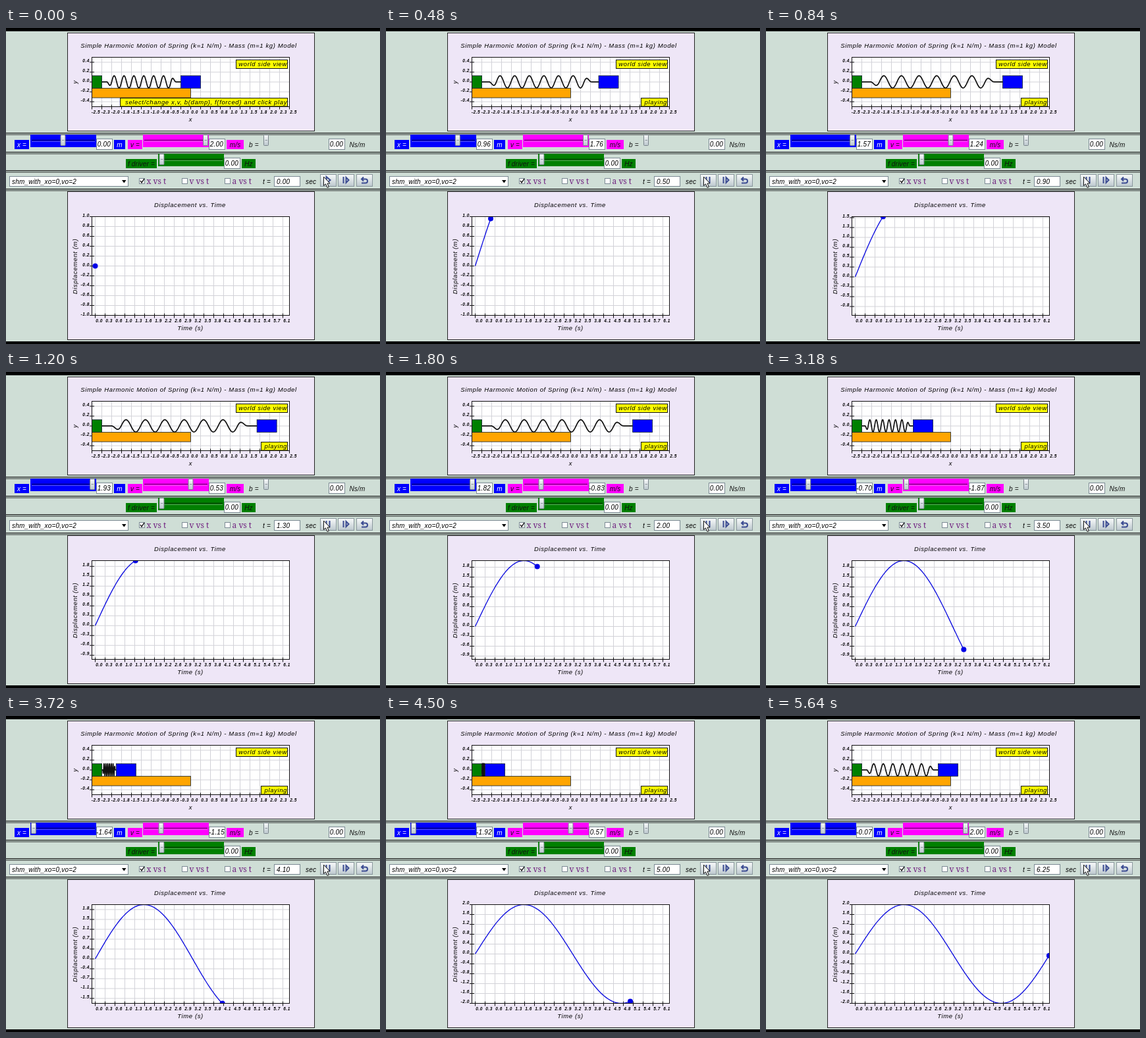
These frames come from a looping animation (568 by 480 pixels, 5700 ms). An HTML page:

```html
<!DOCTYPE html>
<html lang="en">
<head>
<meta charset="utf-8">
<title>Spring and mass model</title>
<style>
html, body { margin: 0; width: 100%; height: 100%; overflow: hidden; background: #cfded6; }
svg { display: block; width: 568px; height: 480px; }
text { font: italic 10px "Liberation Sans", Arial, sans-serif; letter-spacing: .2px; white-space: pre; }
.cap text, text.cap { font-size: 9.5px; letter-spacing: .62px; }
.num text { font-weight: bold; font-size: 6.5px; letter-spacing: .55px; }
.mid, .mid text { text-anchor: middle; }
.end, .end text { text-anchor: end; }
.check text { font: 12px "Noto Serif", serif; letter-spacing: 0; fill: #702080; }
.box { fill: #fff; stroke: #7c8a94; }
.panel { fill: #eee6f7; stroke: #222; }
.plot { fill: #fff; stroke: none; }
.frame { fill: none; stroke: #111; }
.grid { stroke: #d2d2d8; fill: none; }
.tick { stroke: #111; fill: none; }
.note { fill: #ff0; stroke: #111; }
.body { stroke: #102030; stroke-width: .8; }
.icon { fill: none; stroke: #3c4c92; stroke-width: 2; }
</style>
</head>
<body>
<svg viewBox="0 0 568 480">
  <defs>
    <clipPath id="view"><rect x="130" y="286" width="301" height="151"/></clipPath>
    <linearGradient id="metal" x2="0" y2="1">
      <stop offset="0" stop-color="#f8fafa"/><stop offset="1" stop-color="#bcc8ce"/>
    </linearGradient>
    <g id="knob">
      <rect x="-3.5" y="-8.5" width="7" height="16" rx="1" fill="url(#metal)" stroke="#7b858c"/>
      <path d="M-1.5 -.5H2" stroke="#8b959c"/>
    </g>
    <rect id="button" x=".5" y="222.5" width="24" height="18" fill="url(#metal)" stroke="#8a979d"/>
  </defs>

  <rect width="568" height="480" fill="#cfded6"/>
  <path d="M0 0H568V5H0ZM0 476H568V480H0Z"/>
  <g id="rules"></g>

  <!-- world view -->
  <rect class="panel" x="93.5" y="7.5" width="375" height="149"/>
  <rect class="plot" x="130.5" y="44.5" width="300" height="75"/>
  <g id="worldAxes"></g>
  <g class="cap mid">
    <text x="277.5" y="30">Simple Harmonic Motion of Spring (k=1 N/m) - Mass (m=1 kg) Model</text>
    <text x="280.5" y="142">x</text>
    <text transform="translate(108 82) rotate(-90)">y</text>
  </g>
  <rect class="body" x="130.5" y="91.5" width="150" height="14.5" fill="#ffa500"/>
  <rect class="body" x="130.5" y="72.5" width="15" height="19" fill="#008000"/>
  <path id="spring" fill="none" stroke="#111" stroke-width="1.7" stroke-linejoin="round"/>
  <rect id="mass" class="body" y="72.5" width="30" height="19" fill="#00f"/>
  <rect class="frame" x="130.5" y="44.5" width="300" height="75"/>
  <g class="cap end">
    <rect class="note" x="349.5" y="48.5" width="78" height="13"/>
    <text x="427" y="58">world side view</text>
    <rect id="noteBox" class="note" y="106.5" height="12.5"/>
    <text id="note" x="427" y="116"></text>
  </g>

  <!-- controls -->
  <g id="sliders"></g>
  <rect class="box" x="5.5" y="225.5" width="180" height="15"/>
  <text x="9" y="237">shm_with_xo=0,vo=2</text>
  <path d="M176 231h6.5l-3.2 4.5z"/>
  <g id="checks" class="check"></g>
  <text x="390" y="237">t =</text>
  <rect class="box" x="407.5" y="225.5" width="39" height="15"/>
  <text id="clock" x="411" y="237"></text>
  <text x="455" y="237">sec</text>
  <use href="#button" x="477"/><use href="#button" x="504"/><use href="#button" x="532"/>
  <path id="run" class="icon"/>
  <path class="icon" d="M512.5 226V236M516.5 227V235L520.5 231Z"/>
  <path class="icon" d="M543 226.500L540 229.500L543 232.500M540 229.500H546A2.800 2.800 0 0 1 546 235.500H540"/>
  <path d="M482.500 226V239.500L485.500 236.800L488 242.500L490.300 241.500L488 236H492Z" fill="#fff" stroke="#111"/>

  <!-- graph -->
  <rect class="panel" x="93.5" y="248.5" width="375" height="225"/>
  <rect class="plot" x="130.5" y="286.5" width="300" height="150"/>
  <g id="timeAxis"></g>
  <g id="valueAxis"></g>
  <g class="cap mid">
    <text x="279.5" y="271.500">Displacement vs. Time</text>
    <text x="280" y="459">Time (s)</text>
    <text transform="translate(108 362) rotate(-90)">Displacement (m)</text>
  </g>
  <g clip-path="url(#view)">
    <path id="curve" fill="none" stroke="#1414e0" stroke-width="1.4"/>
    <circle id="dot" r="4" fill="#0000e6"/>
  </g>
  <rect class="frame" x="130.5" y="286.5" width="300" height="150"/>
</svg>

<script>
const $ = id => document.getElementById(id);
const range = (n, from = 0) => Array.from({ length: n }, (_, i) => from + i);
const LOOP = 5700, STEP = 60;
const T0 = 135.5, T_SCALE = 47.1, TOP = 286.5, HEIGHT = 150, GAP = 15;

function columns(x0, count, top, bottom, label) {
  return range(count).map(i => {
    const x = x0 + i * GAP;
    return `<path class="grid" d="M${x} ${top}V${bottom}"/>
      <path class="tick" d="M${x} ${bottom - 3}v7"/>
      <g class="num mid"><text x="${x + 6}" y="${bottom + 10}">${label(i)}</text></g>`;
  }).join('');
}

function row(y, label) {
  return `<path class="grid" d="M130.5 ${y}H430.5"/><path class="tick" d="M127 ${y}h7"/>
    <g class="num end"><text x="127" y="${y}">${label}</text></g>`;
}

function tag(x, y, width, fill, ink, label) {
  return `<rect x="${x}" y="${y - 7}" width="${width}" height="14" fill="${fill}"/>
    <text class="mid" x="${x + width / 2}" y="${y + 4}" fill="${ink}">${label}</text>`;
}

function slider(id, x, y, fill, at) {
  return `<rect x="${x}" y="${y - 9}" width="100" height="19" fill="${fill}"/>
    ${fill === 'none' ? '' : `<path d="M${x + 2} ${y - .5}h96" stroke="#000" stroke-opacity=".4" stroke-width="2"/>
    <path d="M${x + 2} ${y + 1.5}h96" stroke="#fff" stroke-opacity=".35"/>`}
    <use id="${id}Knob" href="#knob" x="${at}" y="${y}"/>
    <rect class="box" x="${x + 100.5}" y="${y - 2.5}" width="24" height="16"/>
    <text id="${id}Value" class="mid" x="${x + 112}" y="${y + 9}">0.00</text>`;
}

$('rules').innerHTML = [159.5, 188.5, 216.5, 244.5].map(y =>
  `<path d="M0 ${y}H568M0 ${y + 2.5}H568" stroke="#222"/><path d="M0 ${y + 1.2}H568" stroke="#9aa8a2"/>`).join('');

$('worldAxes').innerHTML =
  columns(130.5, 21, 44.5, 119.5, i => ((i - 10) / 4 + Math.sign(i - 10) * 1e-6).toFixed(1)) +
  range(5, -2).map(k => row(82 - k * GAP, (k / 5).toFixed(1))).join('');

$('timeAxis').innerHTML = columns(T0, 20, TOP, TOP + HEIGHT, i => (i * .319).toFixed(1));

$('sliders').innerHTML =
  tag(13, 177, 22, '#00f', '#fff', 'x =') + slider('x', 37, 171, '#00f', 86.5) +
  tag(164, 177, 17, '#00f', '#fff', 'm') +
  tag(185, 177, 22, '#f0f', '#111', 'v =') + slider('v', 208, 171, '#f0f', 258) +
  tag(335, 177, 26, '#f0f', '#111', 'm/s') +
  tag(366, 177, 21, 'none', '#111', 'b =') + slider('b', 390, 171, 'none', 395) +
  tag(519, 177, 29, 'none', '#111', 'Ns/m') +
  tag(182, 206, 47, '#008000', '#111', 'f driver =') + slider('f', 231, 200, '#008000', 236.5) +
  tag(358, 206, 21, '#008000', '#111', 'Hz');

$('checks').innerHTML = ['x', 'v', 'a'].map((name, i) => {
  const x = [202.5, 267.5, 332.5][i];
  return `<rect class="box" x="${x}" y="228.5" width="8" height="8"/>
    <text x="${x + 11}" y="237">${name} vs t</text>`;
}).join('') + '<path d="M204 232l2 3 4 -6" fill="none" stroke="#222" stroke-width="1.5"/>';

// Eight loops; the outer half loops are straight and the next ones ramp up.
function springPath(from, to) {
  const loops = 8, per = 15, total = loops * per;
  return 'M' + range(total + 1).map(i => {
    const s = i / per;
    const k = Math.max(0, Math.min(1, 2 * s - 1, 2 * (loops - s) - 1));
    const x = from + (to - from) * i / total;
    return `${x.toFixed(2)} ${(81.8 - 9.4 * k * Math.sin(2 * Math.PI * s)).toFixed(2)}`;
  }).join('L');
}

function draw(step) {
  const ticks = Math.floor(step * 4 / 3), t = ticks / 20;
  const x = 2 * Math.sin(t), v = 2 * Math.cos(t);
  const playing = step > 0;

  const left = 265.5 + 60 * x;
  $('mass').setAttribute('x', left);
  $('spring').setAttribute('d', springPath(145.5, left));

  const boxX = playing ? 387.5 : 173.5;
  $('noteBox').setAttribute('x', boxX);
  $('noteBox').setAttribute('width', 427.5 - boxX);
  $('note').textContent = playing ? 'playing' : 'select/change x,v, b(damp), f(forced) and click play';
  $('run').setAttribute('d', playing ? 'M486.5 226V236M491.5 226V236' : 'M486.500 226V236L492.500 231Z');

  // Knobs snap to whole units.
  $('xKnob').setAttribute('x', 86.5 + 22.3 * Math.round(x));
  $('vKnob').setAttribute('x', 258 + 22.5 * Math.round(v));
  $('xValue').textContent = x.toFixed(2);
  $('vValue').textContent = v.toFixed(2);
  $('clock').textContent = t.toFixed(2);

  const track = range(ticks + 1).map(i => 2 * Math.sin(i / 20));
  const max = Math.max(1, ...track), min = Math.min(-1, ...track);
  const scale = HEIGHT / (max - min), zero = TOP + max * scale;
  $('valueAxis').innerHTML = range(21, -10)
    .map(k => ({ y: zero - k * GAP, value: k * GAP / scale }))
    .filter(({ y }) => y > TOP - .1 && y < TOP + HEIGHT + .1)
    .map(({ y, value }) => row(y, value.toFixed(1))).join('');

  const points = track.map((p, i) => [T0 + i / 20 * T_SCALE, zero - p * scale]);
  const [dotX, dotY] = points[ticks];
  $('curve').setAttribute('d', 'M' + points.map(p => p.join(' ')).join('L'));
  $('dot').setAttribute('cx', dotX);
  $('dot').setAttribute('cy', dotY);
}

let shown = -1;
function tick() {
  const step = Math.floor(performance.now() % LOOP / STEP);
  if (step !== shown) draw(shown = step);
  requestAnimationFrame(tick);
}
tick();
</script>
</body>
</html>
```
